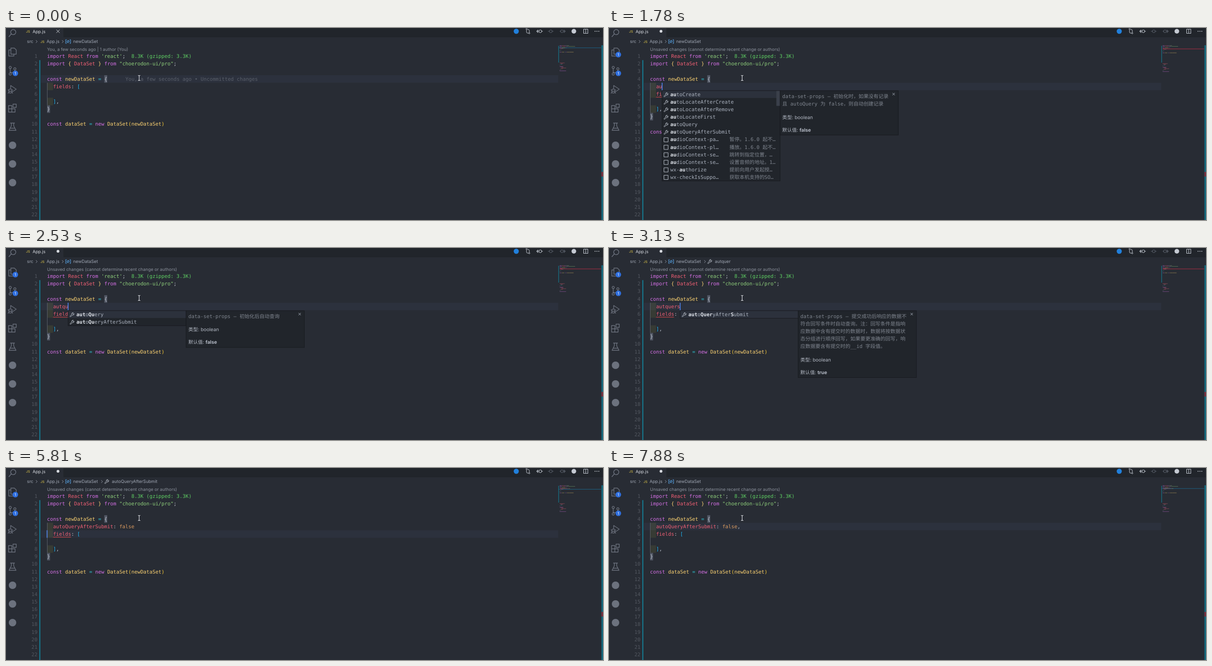
Animation, 1280 px wide and 411 px high, one loop 8000 ms. Source, as an HTML page:

```html
<!DOCTYPE html>
<html lang="en">
<head>
<meta charset="utf-8">
<title>Editor completion</title>
<style>
html, body { margin: 0; width: 100%; height: 100%; overflow: hidden; background: #282c34; }
svg { display: block; }
text { white-space: pre; text-rendering: geometricPrecision; }
.code { font: 10.72px "DejaVu Sans Mono", "Noto Sans CJK SC", "Noto Sans CJK", monospace; }
.ui { font: 9.3px Inter, sans-serif; }
.facts { font: 10.3px Inter, "Noto Sans CJK SC", "Noto Sans CJK", sans-serif; }
</style>
</head>
<body>
<svg id="stage" width="1280" height="411" viewBox="0 0 1280 411"></svg>
<script>
const stage = document.getElementById('stage');
const LOOP = 8000, LEFT = 88, CHAR = 6.4536, LINE = 16.13, BASE = 11.6;
const COLORS = {
  p: '#d670e6', r: '#ef5f74', g: '#8fd07c', y: '#f9d071', c: '#2fbccb', b: '#1fb4f0', k: '#ffcf33',
  o: '#d99a5f', i: '#5fcf63', w: '#c3c9d4', n: '#abb2bf', B: '#dfe3ea', d: '#7f858f'
};
const colX = col => LEFT + col * CHAR;
const rowY = row => 52.6 + LINE * (row - 1);

// Drawing helpers. Coloured text is "kText|kText", where k is a colour key.
const rect = (x, y, w, h, fill, extra = '') =>
  `<rect x="${x}" y="${y}" width="${w}" height="${h}" fill="${fill}" ${extra}/>`;
const dot = (x, y, r, fill) => `<circle cx="${x}" cy="${y}" r="${r}" fill="${fill}"/>`;
const line = (d, color, width = 1.2) =>
  `<path d="${d}" fill="none" stroke="${color}" stroke-width="${width}" stroke-linejoin="round"/>`;
const at = (x, y, body) => `<g transform="translate(${x} ${y})">${body}</g>`;
const ui = (x, y, text, fill = '#a0a7b4', extra = '') =>
  `<text class="ui" x="${x}" y="${y}" fill="${fill}" ${extra}>${text}</text>`;
const facts = (x, y, text) => `<text class="facts" x="${x}" y="${y}" fill="#b4bac5">${text}</text>`;
const paint = s => s.split('|').map(part =>
  `<tspan fill="${COLORS[part[0]]}"${part[0] === 'B' ? ' font-weight="700"' : ''}>${part.slice(1)}</tspan>`).join('');
const code = (x, y, s, extra = '') => `<text class="code" x="${x}" y="${y}" ${extra}>${paint(s)}</text>`;
// Full-width punctuation for Chinese text.
const wide = s => s.replace(/,/g, '\uff0c').replace(/:/g, '\uff1a');
const wrench = (x, y) => at(x, y, line('M7.5 .8A2.8 2.8 0 0 0 4.2 4.6L.9 7.9a.9 .9 0 0 0 1.3 1.3L5.5 5.9A2.8 2.8 0 0 0 9.2 2.5L7.4 4.2 5.8 2.6Z', '#c0c6d0', 1));
const square = (x, y) => at(x, y, line('M.5 .5h9v9h-9z', '#c0c6d0', 1));
const enumIcon = (x, y) => at(x, y, line('M4.5 3V1h5v4h-3M.5 4.5h5v4h-5zM2 6.5h2M6.5 3h1.5', '#e8962e', 1.2));

const QUERY = 'autoQuery', SUBMIT = 'autoQueryAfterSubmit';
const MENUS = {
  all: {
    items: ['autoCreate', 'autoLocateAfterCreate', 'autoLocateAfterRemove', 'autoLocateFirst', QUERY, SUBMIT,
      'audioContext-pa…', 'audioContext-pl…', 'audioContext-se…', 'audioContext-se…', 'wx-authorize', 'wx-checkIsSuppo…'],
    notes: ['暂停。1.6.0 起不…', '播放。1.6.0 起不…', '跳转到指定位置,…', '设置音频的地址。1…', '提前向用户发起授…', '获取本机支持的SO…'],
    doc: ['初始化时,如果没有记录', '且 autoQuery 为 false,则自动创建记录'], initial: 'false'
  },
  query: { items: [QUERY, SUBMIT], doc: ['初始化后自动查询'], initial: 'false' },
  submit: {
    items: [SUBMIT], initial: 'true',
    doc: ['提交成功后响应的数据不', '符合回写条件时自动查询。注:回写条件是指响', '应数据中含有提交时的数据时,数据将按数据状',
      '态分组进行顺序回写,如果要更准确的回写,响', '应数据要含有提交时的__id 字段值。']
  },
  bool: { items: ['true', 'false'], width: 330 }
};

const typed = (text, menu) => ({ text, menu, col: 2 + text.length, on: 1 });
const STEPS = [
  [0, { row: 4, col: 20, on: 0, text: '', value: '', crumb: '', menu: '', pick: 0 }],
  [450, { on: 1 }],
  [900, { dirty: 1, row: 5, col: 2 }],
  [1340, { lens: 1, on: 0 }],
  [1630, typed('a', '')],
  [1780, { ...typed('au', 'all'), error: 1 }],
  [2080, typed('aut', 'all')],
  [2380, typed('autq', 'query')],
  [2530, typed('autqu', 'query')],
  [2680, typed('autque', 'query')],
  [2830, typed('autquer', 'query')],
  [3130, { ...typed('autquers', 'submit'), crumb: 'autquer' }],
  [3430, typed('autquersb', 'submit')],
  [3730, { crumb: 'autquersb' }],
  [3880, { on: 0 }],
  [4170, { text: SUBMIT, value: 'true', menu: 'bool', col: 24, on: 1 }],
  [4470, { crumb: SUBMIT }],
  [4770, { on: 0 }],
  [5220, { on: 1, pick: 1 }],
  [5510, { value: 'false', menu: '', col: 29 }],
  [5810, { row: 6, col: 0 }],
  [5960, { crumb: '' }],
  [6250, { row: 5 }],
  [6550, { col: 29 }],
  [6690, { crumb: SUBMIT }],
  [7140, { on: 0 }],
  [7430, { value: 'false,', col: 30, on: 1 }],
  [7730, { crumb: '', error: 0 }],
  [7880, { on: 0 }]
];

function sourceLines(s) {
  const entry = s.text && `r  ${s.text}` + (s.value ? `|w: |o${s.value.replace(',', '|w,')}` : '');
  return [
    "pimport |rReact |pfrom |g'react'|w;|i  8.3K (gzipped: 3.3K)",
    'pimport |y{ |rDataSet |y} |pfrom |g"choerodon-ui/pro"|w;',
    '',
    'pconst |ynewDataSet |c= |w{',
    ...(s.dirty ? [entry] : []),
    'r  fields|w: |b[', '', 'b  ]|w,', 'w}', '',
    'pconst |ydataSet |c= |pnew |yDataSet|k(|ynewDataSet|k)'
  ];
}

function activityBar(s) {
  const grey = '#6c727e';
  const badge = y => dot(20, y, 6, '#2f6fdf') + ui(20, y + 3, '1', '#fff', 'text-anchor="middle" style="font-size:8px"');
  return line('M11.5 12.5A5.5 5.5 0 1 1 15.5 14.3A5.5 5.5 0 0 1 11.5 12.5L6 19', grey, 1.5) +
    line('M10.5 43h7.5l4 4v9h-11.5zM10.5 47h-4.5v13h11v-4', grey, 1.4) +
    line('M9 87v9M9 93q0 3 5 2.5 5 0 5-5.5M9 82a2.4 2.4 0 1 0 .1 0M19 85a2.4 2.4 0 1 0 .1 0M9 96a2.4 2.4 0 1 0 .1 0', grey, 1.4) +
    line('M10 130v-7l12 8-9 6M6 134a3.3 3.3 0 0 1 6.6 0v2a3.3 3.3 0 0 1-6.6 0zM4 132l2 1.5M4 140l2-2M14.6 132l-2 1.5M14.6 140l-2-2M6 135.5h6.6', grey, 1.3) +
    line('M5.5 166h7v14h-7zM5.5 173h14v7h-14zM15 163h7v7h-7z', grey, 1.4) +
    line('M9 203.5h10M11.5 203.5v6l-5 9.5h15l-5-9.5v-6M9 214.5h10', grey, 1.4) +
    [251, 291, 331].map(y => dot(14, y, 8, grey)).join('') +
    badge(97) + (s.dirty ? badge(57) : '');
}

function header(s) {
  const light = '#c5cad3', dim = '#5b616c', yellow = '#e6cd4a';
  const js = (x, y) => ui(x, y, 'JS', yellow, 'font-weight="700" style="font-size:7px"');
  const chevron = x => line(`M${x} 26l3 3-3 3`, '#8a909c', 1);
  return rect(29, 0, 1251, 20, '#21252b') + rect(29, 0, 94, 20, '#282c34') +
    js(43, 10) + ui(57, 10.5, 'App.js', '#d7dae0') +
    (s.dirty ? dot(111.5, 7, 3, '#d7dae0') : line('M108 3.5l7 7M115 3.5l-7 7', '#d7dae0', 1)) +
    dot(1094, 7, 5.5, '#2180dc') +
    line('M1116 4v5q0 2 3 2h2M1122 10V5q0-2-3-2h-1M1116 1a1.3 1.3 0 1 0 .1 0M1122 10a1.3 1.3 0 1 0 .1 0', light, 1) +
    line('M1142 7h-4l3-3M1138 7l3 3M1149 7h2M1145.5 4a3 3 0 1 0 .1 0', light, 1.2) +
    line('M1162 7h3M1171 7h3M1168 4a3 3 0 1 0 .1 0', dim, 1.2) +
    line('M1187 7h2M1195 7h4l-3-3M1199 7l-3 3M1192 4a3 3 0 1 0 .1 0', dim, 1.2) +
    dot(1217.5, 7, 5, light) +
    line('M1238.5 2.5h9v9h-9zM1243 2.5v9', light, 1.1) +
    [1263, 1267, 1271].map(x => dot(x, 7, 1, light)).join('') +
    ui(45, 32, 'src') + chevron(64) + js(74, 31.7) + ui(87, 32, 'App.js') + chevron(120) +
    line('M130 25h-2v8h2M136.5 25h2v8h-2M130.5 31l5-4M133 26.5a2.5 2.5 0 1 0 .1 0', '#58a9ee', 1) +
    ui(144, 32, 'newDataSet') +
    (s.crumb ? chevron(204) + wrench(211, 24) + ui(227, 32, s.crumb) : '');
}

function minimap(s, lines) {
  const rest = ['rexport default', 'r   fields', 'c   name', 'w}', '', 'pconst view', 'r   columns', 'r      dataSet name', 'r   render', 'w  }', 'w}', 'pexport default App'];
  const top = row => 37.3 + 1.54 * (row - 1);
  const bars = [...lines, ...Array(14).fill(''), ...rest].map((text, i) => {
    let x = 1187;
    return (text ? text.split('|') : []).map(part => {
      if (part[0] === 'i') return '';
      const body = part.slice(1), indent = body.length - body.trimStart().length;
      const bar = rect(x + indent * .77, top(i + 1), body.trim().length * .77, 1, COLORS[part[0]], 'opacity=".42"');
      x += body.length * .77;
      return bar;
    }).join('');
  }).join('');
  const mark = s.error && s.row === 5 && s.value !== 'false'
    ? rect(1187, top(5) + .4, 89, 1.7, '#7a2d3d')
    : rect(1185, top(s.row), 91, 1, '#1c6286');
  return mark + bars + rect(1184.3, 38, 1.2, 36, '#147a90') +
    rect(1276.5, 37, 3.5, 374, '#14667a') + rect(1276.5, 308, 3.5, 10, '#762d3a');
}

function editor(s) {
  const lines = sourceLines(s), close = s.dirty ? 9 : 8;
  const lens = s.lens ? 'Unsaved changes (cannot determine recent change or authors)' : 'You, a few seconds ago | 1 author (You)';
  let out = rect(75, rowY(s.row), 1109, LINE, '#2c313d');
  lines.forEach((text, i) => {
    if (text.slice(1, 3) === '  ') out += rect(LEFT, rowY(i + 1), 2 * CHAR, LINE, '#ffff40', 'opacity=".07"');
  });
  out += rect(LEFT, rowY(5), 1, LINE * (close - 5), '#5a5f69') +
    rect(colX(19), rowY(4), CHAR, LINE, '#505663') + rect(LEFT, rowY(close), CHAR, LINE, '#505663');
  if (s.menu === 'bool') out += rect(colX(24), rowY(5), 4 * CHAR, LINE, '#4a4e57');
  for (let row = 1; row <= 22; row++) {
    const y = rowY(row) + BASE;
    out += code(67.5, y, `w${row}`, 'text-anchor="end" opacity=".27"');
    if (lines[row - 1]) out += code(LEFT, y, lines[row - 1]);
  }
  out += rect(71.5, rowY(2), 2, 411, '#13819a') + ui(LEFT, 48.8, lens, '#8b919c');
  if (!s.dirty) out += code(256, rowY(4) + BASE, 'dYou, a few seconds ago • Uncommitted changes', 'opacity=".55"');
  if (s.error) out += line(`M${colX(2)} 149` + 'l1.6-2l1.6 2'.repeat(12), '#e5484d', 1);
  if (s.on) out += rect(colX(s.col) - .7, rowY(s.row), 1.5, LINE, '#528bff');
  return out + minimap(s, lines);
}

// Bolds the letters of the query, found one after another in the label.
function matched(label, query) {
  let next = 0;
  return [...label].map(ch => {
    const hit = next < query.length && ch.toLowerCase() === query[next];
    if (hit) next++;
    return (hit ? 'B' : 'n') + ch;
  }).join('|');
}

function popup(s) {
  const menu = MENUS[s.menu];
  if (!menu) return '';
  const { items, notes, doc, width = 253 } = menu, x = colX(s.col), y = 134.2, pitch = 16.1;
  const panel = (px, w, h) => rect(px, y, w, h, '#21252b', 'stroke="#181a1f"');
  let out = panel(x, width, items.length * pitch) + rect(x + .5, y + pitch * s.pick + .5, width - 1, pitch - 1, '#2c313c');
  items.forEach((label, i) => {
    const top = y + i * pitch, isNote = notes && i >= 6;
    const icon = s.menu === 'bool' ? enumIcon : isNote ? square : wrench;
    out += icon(x + 3.5, top + 3.5) + code(x + 17.8, top + BASE, matched(label, s.menu === 'bool' ? '' : s.text));
    if (isNote) out += code(x + 144.5, top + BASE, 'd' + wide(notes[i - 6]));
  });
  if (notes) out += rect(x + 245, y + .5, 8, 32, '#3a3f4a');
  if (!doc) return out;
  const dx = x + width, textX = dx + 4.8, last = 146 + pitch * (doc.length - 1);
  out += panel(dx, 253.5, last + 67 - y) + line(`M${dx + 241} 139l5 5M${dx + 246} 139l-5 5`, '#abb2bf', 1);
  doc.forEach((text, i) => {
    out += code(textX, 149.7 + pitch * i, 'd' + (i ? '' : 'data-set-props – ') + wide(text));
  });
  return out + facts(textX, last + 32.4, '类型: boolean') +
    facts(textX, last + 59.4, `默认值: <tspan font-weight="700">${menu.initial}</tspan>`);
}

const pointer = line('M283 101.5q2.5 0 2.5 1.5v8q0 1.5 2.5 1.5M288 101.5q-2.5 0-2.5 1.5M285.5 111q0 1.5-2.5 1.5', '#e8eaee', 1.1);

let shown = 0;
function frame(now) {
  const count = STEPS.filter(([start]) => start <= now % LOOP).length;
  if (count !== shown) {
    shown = count;
    const s = Object.assign({}, ...STEPS.slice(0, count).map(step => step[1]));
    stage.innerHTML = editor(s) + header(s) + activityBar(s) + popup(s) + pointer;
  }
  requestAnimationFrame(frame);
}
requestAnimationFrame(frame);
</script>
</body>
</html>
```
